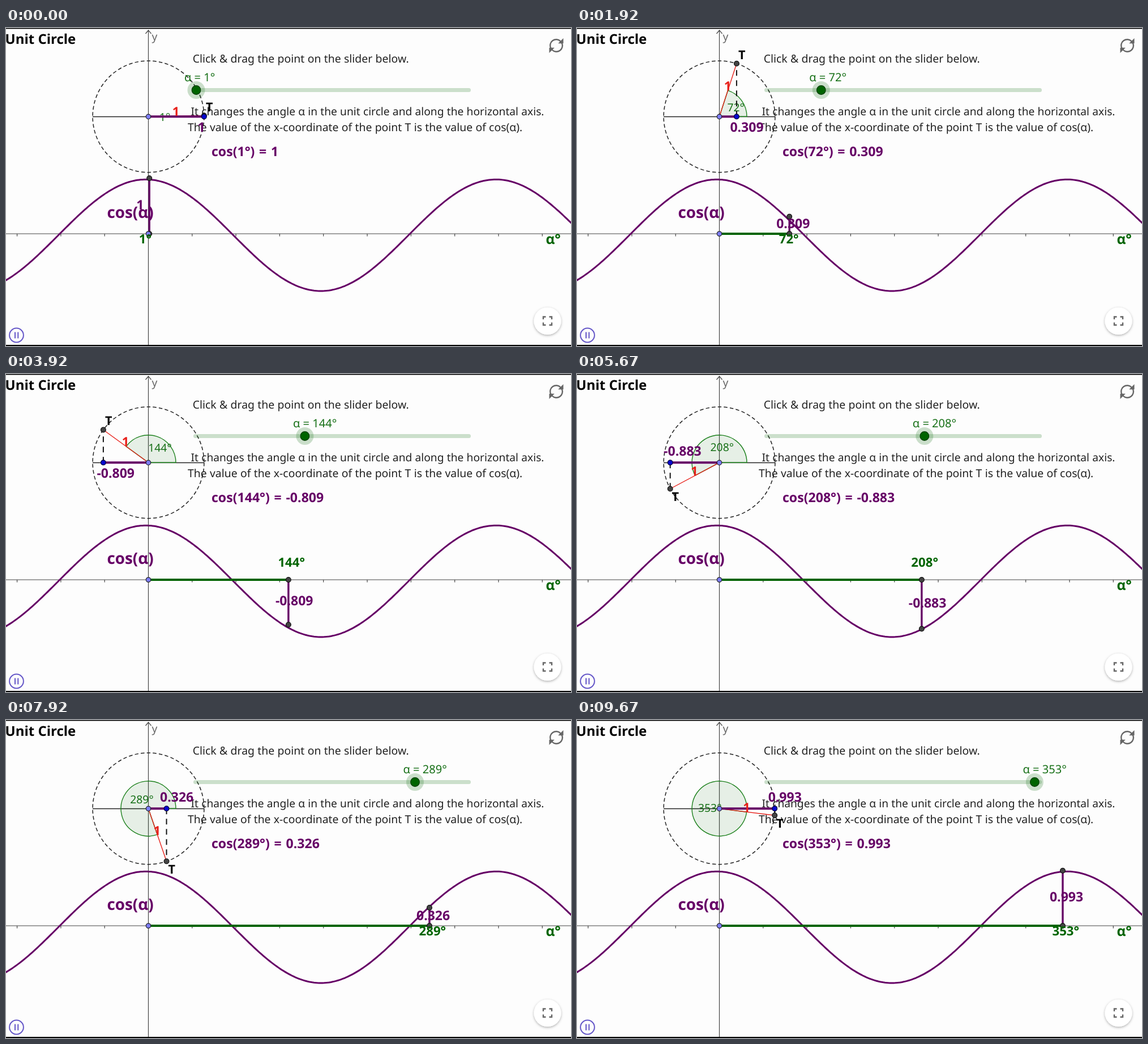
These frames come from a looping animation (998x561 px, 9.76 s). An HTML page:

```html
<!DOCTYPE html>
<html lang="en">
<head>
<meta charset="utf-8">
<title>Unit Circle</title>
<style>
html, body { margin: 0; width: 100%; height: 100%; overflow: hidden; background: #fdfdfd; }
svg { display: block; width: 998px; height: 561px; }
text { font-family: "Noto Sans", "Open Sans", sans-serif; text-rendering: geometricPrecision; white-space: pre; }
.b { font-weight: 700; }
.note { fill: #222; word-spacing: .25px; }
.purple { fill: #606; }
.green { fill: #006400; }
.seg { fill: none; stroke: #606; }
.dot { fill: #444; stroke: #111; stroke-width: 1.2; }
.icon { fill: none; stroke: #666; stroke-width: 2.4; }
</style>
</head>
<body>
<svg id="stage" viewBox="0 0 998 561" xmlns="http://www.w3.org/2000/svg">
  <defs>
    <filter id="shadow" x="-30%" y="-30%" width="160%" height="160%">
      <feDropShadow dx="0" dy="1.5" stdDeviation="2" flood-color="#000" flood-opacity=".32"/>
    </filter>
  </defs>
  <rect width="998" height="561" fill="#fdfdfd"/>

  <!-- axes -->
  <g fill="none" stroke="#444" stroke-width="1.2">
    <path d="M251.5 4V559M246.5 10L251.5 4L256.5 10M0 363H998"/>
    <path id="ticks"/>
    <path d="M153 156.5H350" stroke="#222" stroke-width="1.4"/>
  </g>
  <text x="257.5" y="22" font-size="19.3" fill="#666">y</text>
  <circle cx="251.5" cy="156.3" r="98.4" fill="none" stroke="#222" stroke-width="1.5" stroke-dasharray="6.5 4.2"/>
  <path id="curve" class="seg" stroke-width="3"/>

  <!-- fixed text -->
  <text class="b" x="-1.5" y="28" font-size="24">Unit Circle</text>
  <text class="note" x="329.7" y="60.5" font-size="19.45">Click &amp; drag the point on the slider below.</text>
  <text class="note" x="326.5" y="154" font-size="19.2">It changes the angle α in the unit circle and along the horizontal axis.</text>
  <text class="note" x="321" y="182" font-size="19.4">The value of the x-coordinate of the point T is the value of cos(α).</text>
  <text class="b purple" x="178.5" y="335" font-size="27.8">cos(α)</text>
  <text class="b green" x="953.5" y="381" font-size="24.5">α°</text>

  <!-- slider -->
  <path d="M334.5 109.5H817.5" stroke="#006400" stroke-opacity=".2" stroke-width="7" stroke-linecap="round"/>
  <g id="knob">
    <circle r="15.5" cy="109.5" fill="#006400" fill-opacity=".2"/>
    <circle r="7.8" cy="109.5" fill="#006400" stroke="#023c02" stroke-width="1.2"/>
    <text id="alpha" x="-21" y="94" font-size="20.1" fill="#177017"></text>
  </g>

  <!-- unit circle -->
  <path id="wedge" fill="#006400" fill-opacity=".09" stroke="#1c801c" stroke-width="1.4"/>
  <text id="arcText" font-size="19.3" fill="#177017"></text>
  <path id="drop" fill="none" stroke="#111" stroke-width="2" stroke-dasharray="10 8"/>
  <path id="ray" fill="none" stroke="#e8201a" stroke-width="1.4"/>
  <path id="xSeg" class="seg" stroke-width="4"/>
  <circle id="tDot" class="dot" r="4.4"/>
  <circle id="xDot" r="4.4" fill="#0808d0" stroke="#003" stroke-width="1.2"/>
  <circle cx="251.5" cy="156.3" r="4.2" fill="#7d7dff" stroke="#222" stroke-width="1.2"/>
  <text id="one" class="b" font-size="22" fill="#e8201a" text-anchor="middle">1</text>
  <text id="tText" class="b" font-size="21.5">T</text>
  <text id="xText" class="b purple" font-size="23"></text>
  <text id="formula" class="b purple" x="363" y="226" font-size="23.1" word-spacing="1.7"></text>

  <!-- graph -->
  <path id="aSeg" fill="none" stroke="#006400" stroke-width="4.2"/>
  <path id="ySeg" class="seg" stroke-width="3.4"/>
  <circle id="aDot" class="dot" r="4.4" cy="363"/>
  <circle id="yDot" class="dot" r="4.4"/>
  <circle cx="251.5" cy="363" r="4.2" fill="#7d7dff" stroke="#222" stroke-width="1.2"/>
  <text id="yText" class="b purple" font-size="23"></text>
  <text id="aText" class="b green" font-size="22.2"></text>

  <!-- controls -->
  <g class="icon">
    <path d="M962.4 36A10.7 10.7 0 0 1 979.5 23.5M981.6 26A10.7 10.7 0 0 1 964.5 38.5"/>
    <path d="M984.5 18V27.3H975.2ZM959.5 44V34.7H968.8Z" fill="#666" stroke="none"/>
  </g>
  <circle cx="956.5" cy="517" r="24" fill="#fff" filter="url(#shadow)"/>
  <path class="icon" d="M949 514V509.5H953.5M959.5 509.5H964V514M964 519.5V524H959.5M953.5 524H949V519.5"/>
  <g fill="none" stroke="#6557c8" stroke-width="2">
    <circle cx="18.5" cy="542" r="12.4"/>
    <path d="M16 536.5V547.5M21.3 536.5V547.5"/>
  </g>
  <path d="M0 .6H998M0 560H998" stroke="#000" stroke-width="2"/>
</svg>
<script>
const LOOP = 9760, STEP = 1000 / 12, LAST = 116;
const CX = 251.5, CY = 156.3, R = 98.4, AXIS = 363, PER_DEG = 1.718, ARC = 48.5;
const rad = d => d * Math.PI / 180;
const el = id => document.getElementById(id);

function set(id, attrs, text) {
  const node = el(id);
  for (const k in attrs) node.setAttribute(k, attrs[k]);
  if (text !== undefined) node.textContent = text;
}

function drawGraph() {
  let ticks = "", curve = "";
  for (let d = -135; d <= 405; d += 45) ticks += `M${CX + d * PER_DEG} ${AXIS}v4.5`;
  for (let x = -2; x <= 1000; x += 3) {
    const y = 365.6 - 98.4 * Math.cos(rad((x - 247) / PER_DEG));
    curve += `${curve ? "L" : "M"}${x} ${y.toFixed(2)}`;
  }
  set("ticks", { d: ticks });
  set("curve", { d: curve });
}

function angleAt(t) {
  const k = Math.min(LAST, Math.floor((t + 4) / STEP));
  return k ? Math.floor(2.5 + 3.025 * k) : 1;
}

function render(t) {
  const a = angleAt(t), c = Math.cos(rad(a)), s = Math.sin(rad(a));
  const value = String(+c.toFixed(3)), deg = a + "°";
  const tx = CX + R * c, ty = CY - R * s;
  const upper = a < 180;

  set("knob", { transform: `translate(${336 + (a - 1) * 1.342} 0)` });
  set("alpha", {}, "α = " + deg);
  set("formula", {}, `cos(${deg}) = ${value}`);

  const mid = rad(a / 2);
  set("wedge", { d: `M${CX} ${CY}h${ARC}A${ARC} ${ARC} 0 ${upper ? 0 : 1} 0 ${CX + ARC * c} ${CY - ARC * s}Z` });
  set("arcText", { x: 242.5 + 28.5 * Math.cos(mid), y: 164 - 28.5 * Math.sin(mid) }, deg);
  set("drop", { d: `M${tx} ${CY}V${ty}` });
  set("ray", { d: `M${CX} ${CY}L${tx} ${ty}` });
  set("xSeg", { d: `M${CX} ${CY}H${tx}` });
  set("tDot", { cx: tx, cy: ty });
  set("xDot", { cx: tx, cy: CY });
  set("one", { x: (CX + tx) / 2 - 0.7, y: (CY + ty) / 2 });
  set("tText", { x: tx + 3, y: ty + (upper ? -8 : 21.5) });
  set("xText", { x: tx - 11.5, y: upper ? 183 : 144 }, value);

  const gx = CX + a * PER_DEG, gy = AXIS - 98 * c;
  set("aSeg", { d: `M${CX} ${AXIS}H${gx}` });
  set("ySeg", { d: `M${gx} ${AXIS}V${gy}` });
  set("aDot", { cx: gx });
  set("yDot", { cx: gx, cy: gy });
  set("yText", { x: gx - 23, y: (AXIS + gy) / 2 + 5.5 }, value);
  set("aText", { x: gx - 18.5, y: c < 0 ? 340 : 380 }, deg);
}

let start;
function tick(now) {
  start ??= now;
  render((now - start) % LOOP);
  requestAnimationFrame(tick);
}

drawGraph();
render(0);
requestAnimationFrame(tick);
</script>
</body>
</html>
```
